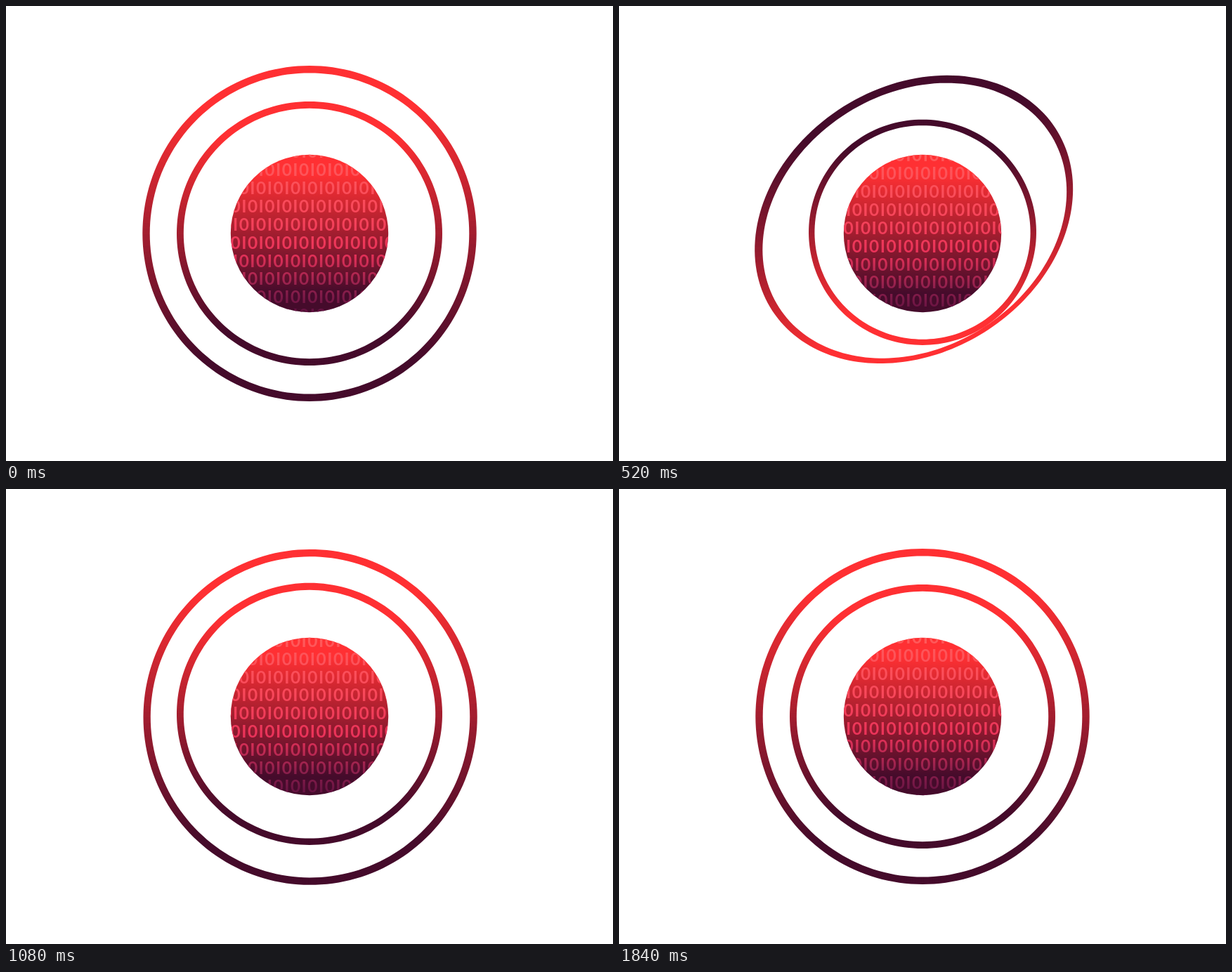
Animation of 864 by 648 pixels, one loop 1.88 s. Source, as an HTML page with a canvas:

```html
<!DOCTYPE html>
<html lang="en">
<head>
<meta charset="utf-8">
<title>Binary planet</title>
<style>
  html, body { margin: 0; width: 100%; height: 100%; overflow: hidden; background: #fff; }
  canvas { display: block; }
</style>
</head>
<body>
<canvas id="stage" width="864" height="648"></canvas>
<script>
const W = 864, H = 648, CX = 432, CY = 324, BALL = 112.2;
const LOOP = 1880, STEP = 40, SPIN = 1120, DEPTH = 1200, TAU = Math.PI * 2;
const RED = [255, 48, 51], DARK = [69, 11, 43];
const ROW = 25.85, COL = 24.4, SCROLL = 0.04;

const ctx = document.getElementById('stage').getContext('2d');
const layer = document.createElement('canvas');
layer.width = W;
layer.height = H;
const pen = layer.getContext('2d');

const clamp = v => Math.min(1, Math.max(0, v));
const smooth = v => (v = clamp(v), v * v * (3 - 2 * v));

function bezier(x1, y1, x2, y2) {
  const at = (p, q, s) => 3 * (1 - s) ** 2 * s * p + 3 * (1 - s) * s * s * q + s ** 3;
  return x => {
    let lo = 0, hi = 1;
    for (let i = 0; i < 24; i++) {
      const mid = (lo + hi) / 2;
      if (at(x1, x2, mid) < x) lo = mid; else hi = mid;
    }
    return x >= 1 ? 1 : at(y1, y2, lo);
  };
}
const settle = bezier(1 / 6, 1 / 6, 2 / 3, 1);
const brake = bezier(1 / 6, 1 / 6, 0.93, 1);

// Red to dark, flat near both ends
function shade(u) {
  const k = clamp((u - 0.12) / 0.76);
  return `rgb(${RED.map((c, i) => Math.round(c + (DARK[i] - c) * k))})`;
}

function gradient(stops) {
  const g = ctx.createLinearGradient(0, CY - BALL, 0, CY + BALL);
  stops.forEach(([at, color]) => g.addColorStop(at, color));
  return g;
}
const ballFill = gradient([[0, shade(0)], [0.12, shade(0.12)], [0.88, shade(0.88)], [1, shade(1)]]);
const digitFill = gradient([[0, '#ff5a5a'], [0.35, '#f8485a'], [0.62, '#ea3259'], [0.85, '#8c1f4c'], [1, '#601040']]);

// Turn a flat point about y, then x, and view it in perspective
function projector(ax, ay, scale) {
  const ca = Math.cos(ax), sa = Math.sin(ax), cb = Math.cos(ay), sb = Math.sin(ay);
  return (x, y) => {
    x *= scale;
    y *= scale;
    const z = -x * sb;
    const k = DEPTH / (DEPTH - y * sa - z * ca);
    return [CX + x * cb * k, CY + (y * ca - z * sa) * k];
  };
}

function drawRing(rx, ry, width, ax, ay, scale = 1) {
  const project = projector(ax, ay, scale), n = 180;
  const point = (i, inset) => {
    const a = i / n * TAU;
    return project((rx - inset) * Math.cos(a), (ry - inset) * Math.sin(a));
  };
  pen.globalCompositeOperation = 'source-over';
  pen.clearRect(0, 0, W, H);
  pen.lineWidth = 3;
  for (let i = 0; i < n; i++) {
    pen.fillStyle = pen.strokeStyle = shade((1 + Math.sin((i + 0.5) / n * TAU)) / 2);
    pen.beginPath();
    for (const [j, inset] of [[i, 0], [i + 1, 0], [i + 1, width], [i, width]]) pen.lineTo(...point(j, inset));
    pen.closePath();
    pen.fill();
    pen.stroke();
  }
  // Trim the coloured wedges to the exact ring
  pen.globalCompositeOperation = 'destination-in';
  pen.fillStyle = '#000';
  pen.beginPath();
  for (const inset of [0, width]) {
    for (let i = 0; i < n; i++) {
      const p = point(i, inset);
      if (i) pen.lineTo(...p); else pen.moveTo(...p);
    }
    pen.closePath();
  }
  pen.fill('evenodd');
  ctx.drawImage(layer, 0, 0);
}

function ballPath() {
  ctx.beginPath();
  ctx.arc(CX, CY, BALL, 0, TAU);
}

function drawDigits(t) {
  ctx.save();
  ballPath();
  ctx.clip();
  ctx.fillStyle = digitFill;
  ctx.font = 'bold 24.5px Lato, sans-serif';
  ctx.textAlign = 'center';
  ctx.textBaseline = 'alphabetic';
  for (let r = -5; r < 10; r++) {
    const y = 311 + r * ROW - SCROLL * t + 8.8;
    for (let c = -1; c < 20; c++) {
      ctx.fillText((c + r) & 1 ? 'I' : '0', 314.4 + c * COL / 2, y);
    }
  }
  ctx.restore();
}

function draw(t) {
  const p = clamp(t / SPIN);
  const shrink = 0.143 * (t < 520 ? smooth((t - 240) / 280) : smooth((800 - t) / 280));
  ctx.fillStyle = '#fff';
  ctx.fillRect(0, 0, W, H);
  ctx.fillStyle = ballFill;
  ballPath();
  ctx.fill();
  drawRing(189, 188, 9.8, TAU * brake(p), 0, 1 - shrink);
  drawRing(237.7, 239, 10.4, -TAU * settle(p), TAU * smooth(p));
  drawDigits(t);
}

const start = performance.now();
function tick() {
  const t = (performance.now() - start) % LOOP;
  draw(Math.floor(t / STEP) * STEP);
  requestAnimationFrame(tick);
}
tick();
</script>
</body>
</html>
```
